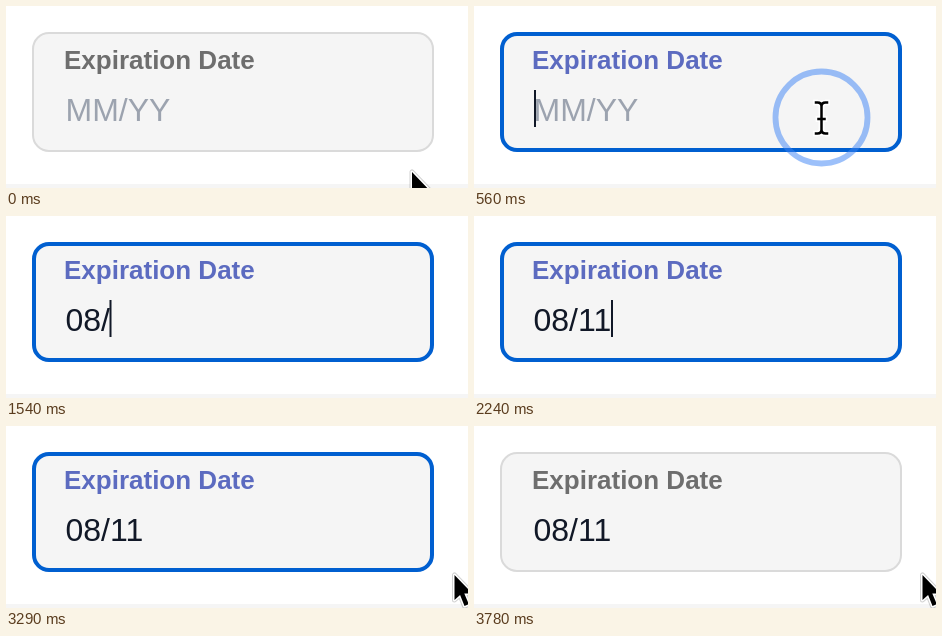
An HTML page that plays this animation: 462x182 px, repeating every 3.92 s.

```html
<!DOCTYPE html>
<html lang="en">
<head>
<meta charset="utf-8">
<title>Expiration date field</title>
<style>
  html, body { margin: 0; width: 100%; height: 100%; overflow: hidden; background: #fff; }
  svg { display: block; width: 462px; height: 182px; }
  text { font-family: "Liberation Sans", Arial, sans-serif; }
</style>
</head>
<body>
<svg viewBox="0 0 462 182">
  <rect width="462" height="182" fill="#fff"/>
  <rect y="178" width="462" height="4" fill="#f5f5f5"/>
  <rect id="box" fill="#f5f5f5"/>
  <text id="label" x="58" y="63" font-size="26" font-weight="700">Expiration Date</text>
  <text id="value" x="59.5" y="114.5" font-size="32"></text>
  <rect id="caret" y="84" width="2" height="37" fill="#111827"/>
  <circle id="ring" fill="none" stroke="#3b82f6" stroke-opacity=".5"/>
  <g id="arrow" stroke-linejoin="round">
    <path d="M0 0V25L5.6 20L10 31L14.3 29.2L9.8 18.6H17.8Z" fill="none" stroke="#000" stroke-opacity=".18" stroke-width="5"/>
    <path d="M0 0V25L5.6 20L10 31L14.3 29.2L9.8 18.6H17.8Z" fill="#000" stroke="#fff" stroke-width="3" paint-order="stroke"/>
  </g>
  <g id="beam" fill="none" stroke-linecap="square">
    <path id="beamPath" d="M-5.5 -15H-4Q0 -15 0 -11Q0 -15 4 -15H5.5M0 -11V12M-5.5 16H-4Q0 16 0 12Q0 16 4 16H5.5M-3 1.5H3" stroke="#fff" stroke-width="5.5"/>
    <use href="#beamPath"/>
    <path d="M-5.5 -15H-4Q0 -15 0 -11Q0 -15 4 -15H5.5M0 -11V12M-5.5 16H-4Q0 16 0 12Q0 16 4 16H5.5M-3 1.5H3" stroke="#000" stroke-width="2.5"/>
  </g>
</svg>
<script>
const LOOP = 3920, STEP = 70;
const RIPPLE = 470, RIPPLE_R = 70.5, RIPPLE_W = 10.5;
const FOCUS = 420, BLUR = 3360;
const START = [406, 166], FIELD = [347.5, 111.5], OUTSIDE = [448.5, 149];
const clicks = [[350, FIELD], [3290, OUTSIDE]];
// time, text, caret position
const keys = [[0, "", 60], [1400, "0", 77], [1540, "08/", 103.5], [1680, "08/1", 121], [1820, "08/11", 137]];

const $ = id => document.getElementById(id);
const set = (id, attrs) => { for (const k in attrs) $(id).setAttribute(k, attrs[k]); };
const show = (id, on) => set(id, { visibility: on ? "visible" : "hidden" });
const clamp = v => Math.min(1, Math.max(0, v));
const ease = p => p * p * (3 - 2 * p);

function move(a, b, from, to, t) {
  const p = ease(clamp((t - from) / (to - from)));
  return a.map((v, i) => v + (b[i] - v) * p);
}

function drawField(t) {
  const focus = t >= FOCUS && t < BLUR;
  const w = focus ? 4 : 2, inset = 26 + w / 2;
  set("box", {
    x: inset, y: inset, width: 402 - w, height: 120 - w, rx: 17 - w / 2,
    stroke: focus ? "#005fd0" : "#dadada", "stroke-width": w
  });
  set("label", { fill: focus ? "#5c6bc0" : "#6e6e6e" });

  const [at, text, x] = keys.filter(k => k[0] <= t).pop();
  $("value").textContent = text || "MM/YY";
  set("value", { fill: text ? "#111827" : "#9ca3af" });
  const since = t - Math.max(at, FOCUS);
  set("caret", { x });
  show("caret", focus && Math.floor(since / 490) % 2 === 0);
}

function drawRipple(t) {
  const hit = clicks.find(c => t > c[0] && t < c[0] + RIPPLE);
  show("ring", hit);
  if (!hit) return;
  const left = 1 - (t - hit[0]) / RIPPLE, w = RIPPLE_W * left;
  set("ring", {
    cx: hit[1][0], cy: hit[1][1],
    r: Math.max(0, RIPPLE_R * (1 - left * left) - w / 2), "stroke-width": w
  });
}

function drawPointer(t) {
  const [x, y] = t < 1400 ? move(START, FIELD, 0, 350, t) : move(FIELD, OUTSIDE, 2240, 2800, t);
  const inside = x < 428 && y < 146;
  const visible = t < 1400 || t > 2240;
  for (const id of ["arrow", "beam"]) {
    set(id, { transform: `translate(${x} ${y})` });
    show(id, visible && inside === (id === "beam"));
  }
}

function draw(time) {
  const t = Math.floor((time % LOOP) / STEP) * STEP;
  const held = Math.min(t, 3780);
  drawField(held);
  drawRipple(held);
  drawPointer(held);
}

const begin = performance.now();
function tick() {
  draw(performance.now() - begin);
  requestAnimationFrame(tick);
}
tick();
</script>
</body>
</html>
```
